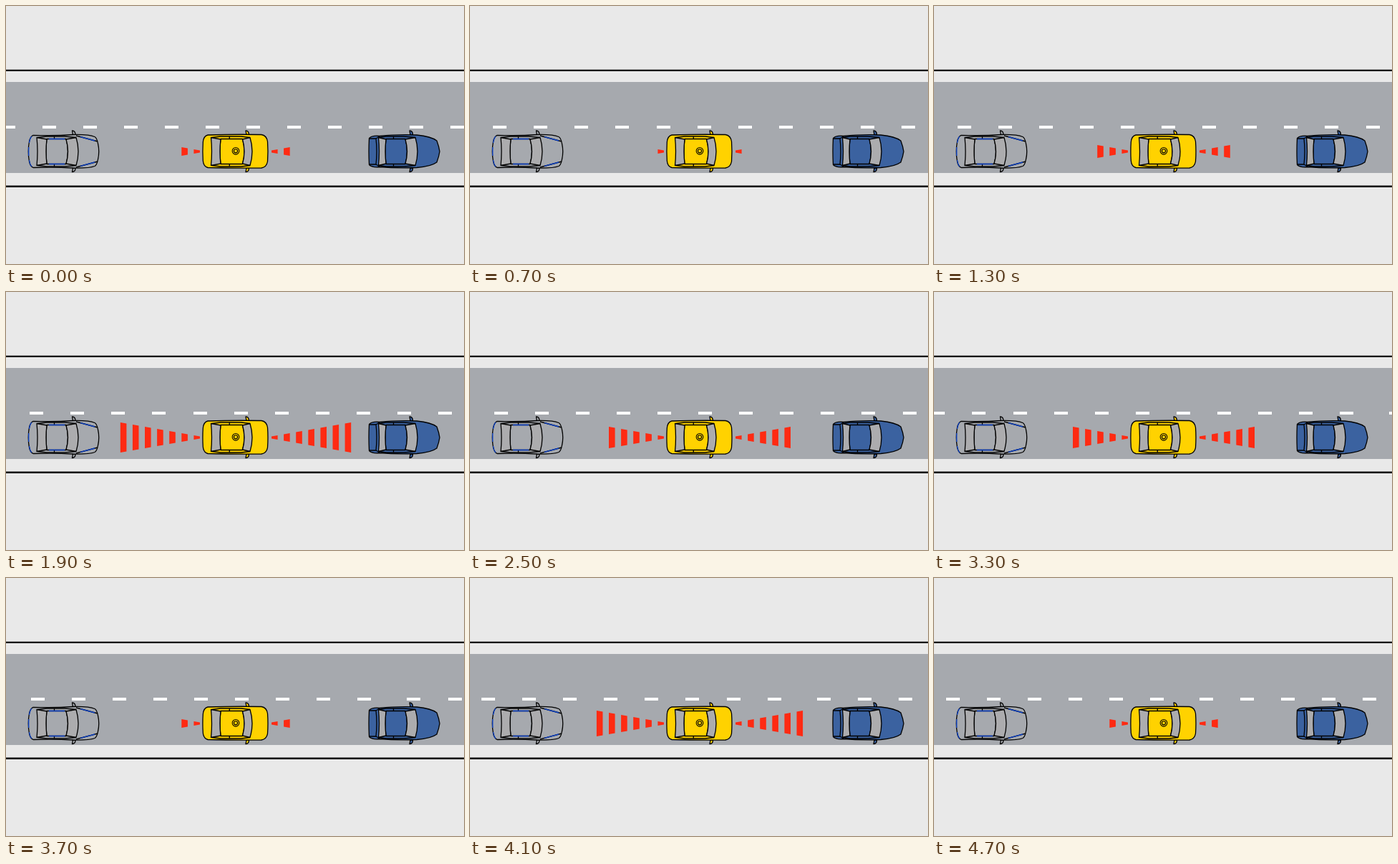
Animation of 640x360 px, one loop 4800 ms. Source, as an HTML page:

```html
<!DOCTYPE html>
<html lang="en">
<head>
<meta charset="utf-8">
<title>Distance sensing</title>
<style>
html, body { margin: 0; width: 100%; height: 100%; overflow: hidden; background: #e9e9e9; }
svg { display: block; width: 100vw; height: 100vh; }
.car { stroke: #000; stroke-width: 1.3; stroke-linejoin: round; }
.glass { fill: #acacae; }
.line { fill: none; }
.trim { fill: none; stroke: #0a3fc4; stroke-width: 1.3; }
</style>
</head>
<body>
<svg viewBox="0 0 640 360">
  <rect width="640" height="360" fill="#e9e9e9"/>
  <rect y="106" width="640" height="127" fill="#a6a9ae"/>
  <path d="M0 88.700H640V91H0ZM0 250.500H640V253H0Z"/>
  <path id="dashes" fill="#fff"/>
  <path id="bars" fill="#ff2a12"/>
  <g id="cars"></g>
</svg>
<script>
const LOOP = 4800, STEP = 100, MID = 203;
const byId = id => document.getElementById(id);
const mod = (a, b) => ((a % b) + b) % b;

// Glass, roof and side windows between rear (a, b) and front (c, d) edges.
function cabin(a, b, c, d, roof) {
  const m = (b + c) / 2 - 3;
  return `<path fill="${roof}" d="M${b} 185.500H${c}Q${c + 5} 203 ${c} 220.500H${b}Q${b - 2} 203 ${b} 185.500Z"/>
    <path class="glass" d="M${a} 183.500Q${a + 2} 203 ${a} 222.500L${b} 220Q${b - 2} 203 ${b} 186Z"/>
    <path class="glass" d="M${c} 186Q${c + 5} 203 ${c} 220L${d - 3} 222.500Q${d + 3} 203 ${d - 3} 183.500Z"/>
    <path class="line" d="M${a + 1} 183.500L${b} 182H${c - 2}L${d - 3} 183.500M${a + 1} 222.500L${b} 224H${c - 2}L${d - 3} 222.500
      M${m} 182V185.500M${m} 220.500V224"/>`;
}

function mirrors(x, fill) {
  return `<path fill="${fill}" d="M${x - 2} 174Q${x + 2.5} 174 ${x + 2.5} 180H${x - 1}Z
    M${x - 2} 231.500Q${x + 2.5} 231.500 ${x + 2.5} 226H${x - 1}Z"/>`;
}

function car(body, fill, mirrorX, inside) {
  return `<g class="car">${mirrors(mirrorX, fill)}<path fill="${fill}" d="${body}"/>${inside}</g>`;
}

const silver = "#a6a9ae", yellow = "#ffd200", blue = "#3b62a0";

byId("cars").innerHTML =
  car("M38 180.300Q66 181.500 94 179.500Q116 179 124 182.500Q127 184 128.500 192Q131 203 128.500 214Q127 222 124 223.500Q116 226.500 94 226Q66 224.500 38 225.500Q34 224 32.500 217Q30 203 32.500 189Q34 182 38 180.300Z",
    silver, 94.5,
    `<path class="trim" d="M36 182Q33.500 184 32.500 191M31.700 197V209M32.500 215Q33.500 222 36 224"/>` +
    cabin(43, 57, 84, 101, silver) +
    `<path class="line" d="M98 181L128 189M98 225L128 217"/>
     <path class="trim" d="M60 185.500H82M60 220.500H82M104 182.600L124 188M104 223.400L124 218"/>`) +
  car("M282 180Q320 178.800 357 179.500Q364 180.500 365.500 189Q366.500 203 365.500 217Q364 225 357 226Q320 226.500 282 225.500Q276 224 275.300 216Q274.500 203 275.300 190Q276 181.500 282 180Z",
    yellow, 337,
    cabin(286.5, 300, 330.5, 344, yellow) +
    `<g fill="none" stroke-width="1.100"><circle cx="321" cy="202.300" r="4.800"/><circle cx="321" cy="202.300" r="2.600"/></g>`) +
  car("M507.500 184.500Q512 180 522 181.500Q545 179 574 180Q594 182 602 188Q605 196 606 203Q605 210 602 218Q594 224 574 225.500Q545 226.500 522 224.500Q512 226 507.500 221.500Q506.500 203 507.500 184.500Z",
    blue, 566,
    cabin(520.5, 531, 558, 575, blue) +
    `<path class="line" d="M508 185H517Q519 203 517 221H508M517 185L522 182M517 221L522 224"/>`);

function dashPath(n) {
  const pitch = 57.08, seam = 20;
  let d = "";
  for (let k = -1; k < 32; k++) {
    const x = Math.round(50.6 + k * pitch + (k > seam ? 12 : 0) - 18.94 * n);
    if (x > -20 && x < 640) d += `M${x} 167h19v4h-19Z`;
  }
  return d;
}

// The beam grows to seven bars and shrinks back.
function barCount(n) {
  const period = 14.21, low = 0.8;
  const x = mod(2.6 - low + 1.82 * n, period);
  return Math.max(1, Math.floor(low + Math.min(x, period - x)));
}

function barPath(count) {
  const half = x => 3 + 0.175 * (x - 379.5);
  let d = "";
  for (let k = 0; k < count; k++) {
    const near = 371 + 17.1 * k, far = near + 8.6;
    const a = half(near), b = half(far);
    for (const at of [x => x, x => 642 - x]) {
      d += `M${at(near)} ${MID - a}L${at(far)} ${MID - b}V${MID + b}L${at(near)} ${MID + a}Z`;
    }
  }
  return d;
}

function draw(time) {
  const n = Math.floor(mod(time, LOOP) / STEP);
  byId("dashes").setAttribute("d", dashPath(n));
  byId("bars").setAttribute("d", barPath(barCount(n)));
}

const start = performance.now();
function tick() {
  draw(performance.now() - start);
  requestAnimationFrame(tick);
}
tick();
</script>
</body>
</html>
```
